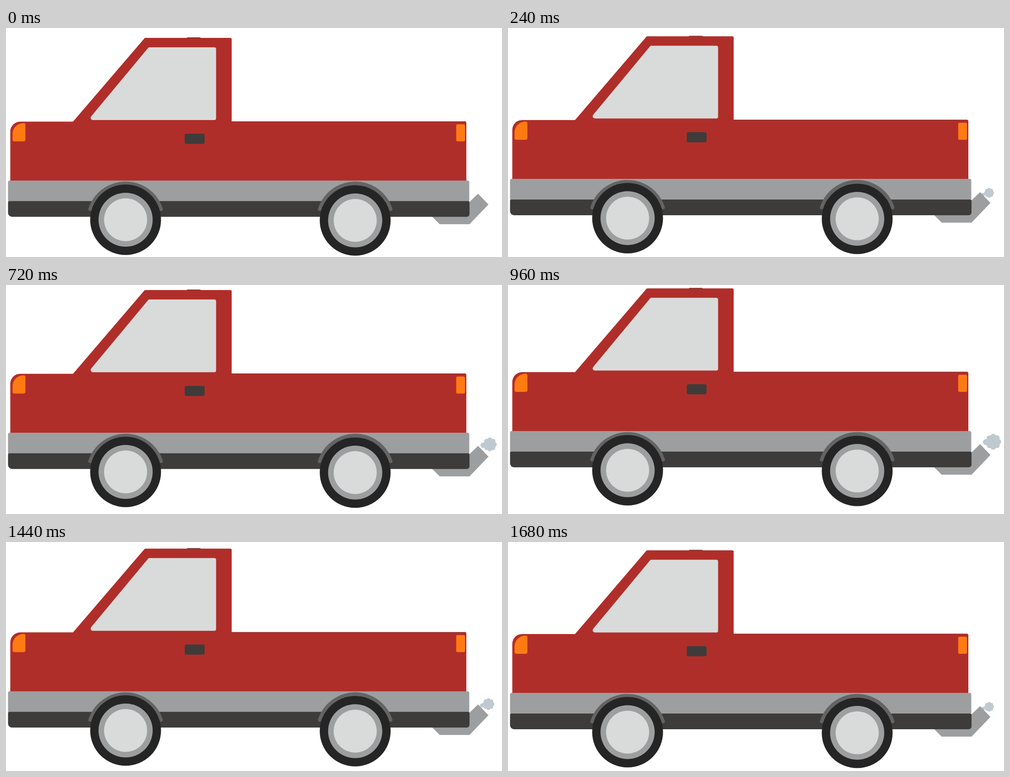
An HTML page with a canvas that plays this animation: 1099 px wide and 510 px high, repeating every 1.92 s.

```html
<!DOCTYPE html>
<html lang="en">
<head>
<meta charset="utf-8">
<title>Pickup truck</title>
<style>
html, body { margin: 0; width: 100%; height: 100%; overflow: hidden; background: #fff; }
canvas { display: block; }
</style>
</head>
<body>
<canvas id="stage" width="1099" height="510"></canvas>
<script>
const ctx = document.getElementById('stage').getContext('2d');
const STEP = 240, STEPS = 8, LIFT = 3.6;
const RED = '#b02e2a', EDGE = '#7d2524', GREY = '#9d9e9f', DARK = '#3d3c3a';
const GLASS = '#d9dbda', ORANGE = '#ff7a12', SMOKE = '#bfc9cf';

function fill(path, color) {
  ctx.fillStyle = color;
  ctx.fill(path);
}

function box(x, y, w, h, r, color) {
  const p = new Path2D();
  p.roundRect(x, y, w, h, r);
  fill(p, color);
}

function disc(x, y, r, color) {
  const p = new Path2D();
  p.arc(x, y, r, 0, Math.PI * 2);
  fill(p, color);
}

// Polygon whose corners are [x, y, radius]
function shape(color, ...corners) {
  const p = new Path2D();
  const [a, b] = [corners[0], corners.at(-1)];
  p.moveTo((a[0] + b[0]) / 2, (a[1] + b[1]) / 2);
  corners.forEach(([x, y, r = 0], i) => {
    const next = corners[(i + 1) % corners.length];
    p.arcTo(x, y, next[0], next[1], r);
  });
  p.closePath();
  fill(p, color);
}

function wheel(x, y) {
  ctx.lineWidth = 8;
  ctx.lineCap = 'round';
  ctx.strokeStyle = '#646464';
  ctx.beginPath();
  ctx.arc(x, 428.5, 82.5, Math.PI + 0.31, -0.31);
  ctx.stroke();
  disc(x, y, 78.5, '#252525');
  disc(x, y, 60, GREY);
  disc(x, y, 47.7, GLASS);
}

function puff(x, y, r) {
  disc(x, y, r * 0.85, SMOKE);
  for (let a = 0; a < 8; a++) {
    const turn = a * Math.PI / 4;
    disc(x + Math.cos(turn) * r * 0.65, y + Math.sin(turn) * r * 0.65, r * 0.35, SMOKE);
  }
}

// The cloud grows and drifts out of the pipe as the truck rises
function smoke(rise) {
  if (!rise) return;
  puff(1063 + 3 * rise, 373 - 6 * rise, 8.5 + 2.3 * rise);
  puff(1051 + 2 * rise, 378 - 7 * rise, 3 + rise);
}

function truck() {
  shape(GREY, [943, 419], [961, 437], [1027, 437], [1069, 393], [1046, 369], [1020, 394]);
  box(401, 21, 30, 3, 1, '#4a2524');
  shape(RED, [9.5, 342], [9.5, 208.5, 22], [148.5, 208.5], [307.5, 22, 4], [500, 22, 3],
    [500, 208], [1020, 208, 3], [1020, 342]);
  box(500, 208, 518, 1, 0, EDGE);
  shape(GLASS, [316, 43, 4], [465.5, 43, 4], [465.5, 205, 4], [182, 205, 5]);
  shape(ORANGE, [14.5, 252.5, 4], [14.5, 212, 24], [43, 212, 4], [43, 252.5, 4]);
  box(997.5, 214.5, 19.5, 38, 3, ORANGE);
  box(396, 235.5, 44, 22.5, 4, DARK);
  box(4.5, 339.7, 1022, 48, 4, GREY);
  box(4.5, 385.5, 1022.5, 35, [3, 3, 6, 9], DARK);
  wheel(265, 427);
  wheel(773.7, 428.5);
}

function draw(now) {
  const n = Math.floor(now / STEP) % STEPS;
  const rise = Math.min(n, STEPS - n);
  ctx.fillStyle = '#fff';
  ctx.fillRect(0, 0, 1099, 510);
  smoke(rise);
  ctx.save();
  ctx.translate(0, -LIFT * rise);
  truck();
  ctx.restore();
}

const start = performance.now();
function tick() {
  draw(performance.now() - start);
  requestAnimationFrame(tick);
}
tick();
</script>
</body>
</html>
```
